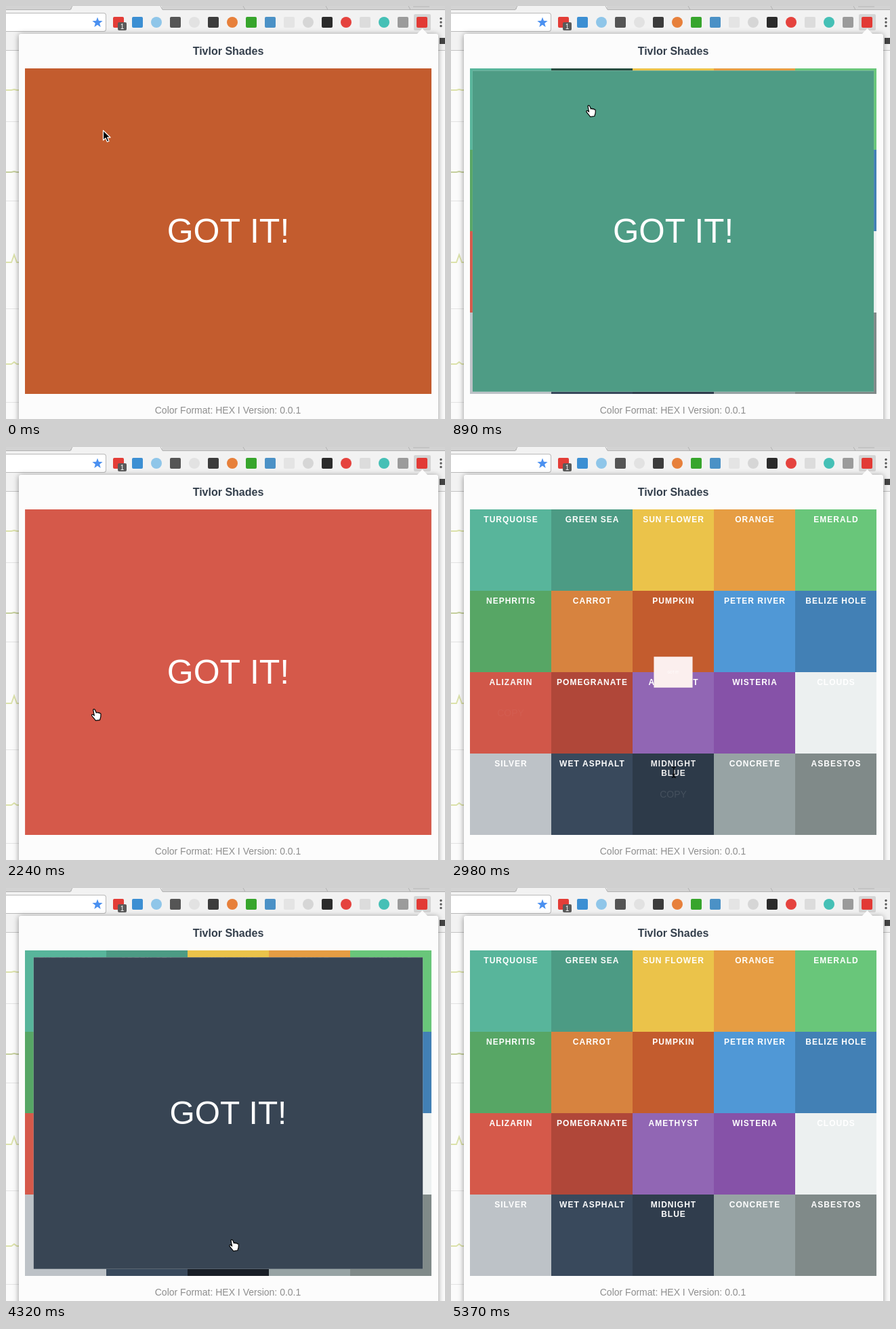
An HTML page with a canvas that plays this animation: 648 px wide and 609 px high, repeating every 5.51 s.

```html
<!DOCTYPE html>
<html lang="en">
<head>
<meta charset="utf-8">
<title>Color picker popup</title>
<style>
html, body { margin: 0; width: 100%; height: 100%; overflow: hidden; background: #fff; }
canvas { display: block; }
</style>
</head>
<body>
<canvas width="648" height="609"></canvas>
<script>
const ctx = document.querySelector('canvas').getContext('2d');
const LOOP = 5510, STEPS = 37, STEP = LOOP / STEPS;
const SANS = '"Liberation Sans", Arial, sans-serif';
const GRID = { x: 28, y: 92, w: 600, h: 480, tile: 120, columns: 5 };
const ZOOM = 500, SHOWN = 918, FADE = 300;

const tiles = Object.entries({
  'TURQUOISE': '#58b59b', 'GREEN SEA': '#4c9b84', 'SUN FLOWER': '#ebc34a', 'ORANGE': '#e69d43', 'EMERALD': '#69c67a',
  'NEPHRITIS': '#57a665', 'CARROT': '#d7833f', 'PUMPKIN': '#c35c2e', 'PETER RIVER': '#5098d6', 'BELIZE HOLE': '#4280b5',
  'ALIZARIN': '#d5594a', 'POMEGRANATE': '#b04739', 'AMETHYST': '#9166b4', 'WISTERIA': '#8652a8', 'CLOUDS': '#ecf0f0',
  'SILVER': '#bdc2c7', 'WET ASPHALT': '#39495c', 'MIDNIGHT\nBLUE': '#303d4d', 'CONCRETE': '#97a3a4', 'ASBESTOS': '#808a89'
});

// The pointer enters a tile, clicks it and leaves
const visits = [
  { tile: 7, enter: -1500, click: -SHOWN, leave: -500 },
  { tile: 1, enter: 330, click: 468, leave: 1200 },
  { tile: 10, enter: 1600, click: 1745, leave: 2755 },
  { tile: 17, enter: 2945, click: 3948, leave: 4500 }
];

// Pointer stops
const stops = [
  { t: 0, x: 143, y: 183 }, { t: 450, x: 199, y: 146 }, { t: 1190, x: 199, y: 146 },
  { t: 1640, x: 97, y: 390 }, { t: 2240, x: 126, y: 386 }, { t: 2540, x: 126, y: 411 }, { t: 2690, x: 126, y: 411 },
  { t: 2980, x: 330, y: 480 }, { t: 3300, x: 329, y: 518 }, { t: 4500, x: 329, y: 518 }, { t: 5070, x: 340, y: 625 }
];

const buttonColors = ('#e33d37 #3c8fd3 #8fc6e9 #555 #e2e2e2 #3c3c3c #e7803b #37a52c #4b91c6 ' +
  '#e4e4e4 #d6d6d6 #2b2b2b #e5433e #dcdcdc #45c0b6 #9b9b9b #e23a35').split(' ');
const roundButtons = [2, 4, 6, 10, 12, 14];

const mix = (a, b, f) => a + (b - a) * f;

// CSS "ease": cubic-bezier(.25, .1, .25, 1)
function ease(x) {
  if (x <= 0) return 0;
  if (x >= 1) return 1;
  let lo = 0, hi = 1, u;
  for (let i = 0; i < 20; i++) {
    u = (lo + hi) / 2;
    if (.75 * u * (1 - u) + u ** 3 < x) lo = u; else hi = u;
  }
  return .3 * u * (1 - u) ** 2 + 3 * u * u * (1 - u) + u ** 3;
}

// Rises from one time and falls again from another
const pulse = (t, from, to, duration) =>
  t < to ? ease((t - from) / duration) : 1 - ease((t - to) / duration);

function pointerAt(t) {
  const next = stops.findIndex(stop => stop.t > t);
  if (next < 0) return stops.at(-1);
  const a = stops[next - 1], b = stops[next], f = (t - a.t) / (b.t - a.t);
  return { x: mix(a.x, b.x, f), y: mix(a.y, b.y, f) };
}

function rect(color, x, y, w, h, radius = 0) {
  ctx.fillStyle = color;
  ctx.beginPath();
  ctx.roundRect(x, y, w, h, radius);
  ctx.fill();
}

function circle(color, x, y, r) {
  rect(color, x - r, y - r, 2 * r, 2 * r, r);
}

function text(str, x, y, font, color, spacing = 0) {
  ctx.font = `${font} ${SANS}`;
  ctx.letterSpacing = spacing + 'px';
  ctx.textAlign = 'center';
  ctx.fillStyle = color;
  ctx.fillText(str, x, y);
}

function line(color, width, points) {
  ctx.strokeStyle = color;
  ctx.lineWidth = width;
  ctx.beginPath();
  points.forEach(([x, y]) => ctx.lineTo(x, y));
  ctx.stroke();
}

function drawStar(x, y, r) {
  ctx.fillStyle = '#4a90f0';
  ctx.beginPath();
  for (let i = 0; i < 10; i++) {
    const a = i * Math.PI / 5 - Math.PI / 2, d = i % 2 ? r * .42 : r;
    ctx.lineTo(x + d * Math.cos(a), y + d * Math.sin(a));
  }
  ctx.fill();
}

function drawTabs() {
  rect('#f2f2f2', 0, 0, 648, 65);
  rect('#d3d3d3', 0, 0, 97, 5);
  rect('#d3d3d3', 230, 0, 418, 5);
  line('#b2b2b2', 1, [[0, 5.5], [95, 5.5], [98, 0]]);
  line('#b2b2b2', 1, [[228, 0], [231, 5.5], [648, 5.5]]);
  for (let x = 350; x < 600; x += 122) line('#b2b2b2', 1, [[x, 0], [x + 3, 5.5]]);
  rect('#c4c4c4', 601, 0, 24, 2);
  line('#c4c4c4', 1, [[0, 65.5], [648, 65.5]]);
}

function drawToolbar() {
  rect('#b9b9b9', -5, 10, 153, 28, 4);
  rect('#fff', -5, 11, 152, 26, 3);
  drawStar(135, 24.5, 8);
  rect('#d5d5d5', 602, 12, 25, 24, 2);
  buttonColors.forEach((color, i) => {
    const x = 166 + 28 * i;
    if (roundButtons.includes(i)) circle(color, x, 24, 8);
    else rect(color, x - 8, 16, 16, 16, 2);
  });
  rect('#5a5a5a', 165, 24, 13, 12, 2);
  text('1', 171.5, 34, '10px', '#fff');
  for (let i = -1; i <= 1; i++) circle('#5a5a5a', 642, 24 + 5.5 * i, 1.7);
  rect('#444', 640, 47, 8, 9);
}

// Left edge of the page: charts with a small peak each
function drawPage() {
  rect('#fbfbfb', 0, 0, 648, 609);
  for (const y of [170, 287, 446, 584]) rect('#e3e3e3', 0, y, 19, 1);
  [[124, 1], [245, 1], [378, 11], [528, 3]].forEach(([y, peak], i) => {
    const points = Array.from({ length: 20 }, (_, x) => [x, y - peak * Math.max(0, 1 - Math.abs(x - 12) / 4)]);
    line(i === 1 ? '#c5cf9c' : '#dce2aa', 2, points);
  });
}

function drawPopup() {
  ctx.save();
  ctx.shadowColor = 'rgba(0,0,0,.42)';
  ctx.shadowBlur = 8;
  ctx.shadowOffsetY = 1;
  rect('#fcfcfc', 19, 41, 619, 600, 3);
  ctx.restore();
  ctx.fillStyle = '#fcfcfc';
  ctx.fill(new Path2D('M606 42L614.5 33L623 42Z'));
  text('Tivlor Shades', 328, 72, 'bold 16px', '#343f4c');
  text('Color Format: HEX I Version: 0.0.1', 327.5, 601, '14px', '#8e8e8e');
}

function drawTiles(t) {
  const { tile: size, columns } = GRID;
  tiles.forEach(([name, color], i) => {
    const x = GRID.x + i % columns * size, y = GRID.y + Math.floor(i / columns) * size;
    rect(color, x, y, size, size);
    name.split('\n').forEach((part, row) =>
      text(part, x + size / 2 + .5, y + 19 + 14 * row, 'bold 12px', '#fff', 1));
    const visit = visits.find(v => v.tile === i);
    if (!visit) return;
    ctx.globalAlpha = pulse(t, visit.enter, visit.leave, FADE);
    rect('rgba(0,0,0,.5)', x, y, size, size);
    text('COPY', x + size / 2, y + 65, '14px', '#fff');
    ctx.globalAlpha = 1;
  });
}

function drawNotice(t) {
  const { tile, click } = visits.findLast(v => t >= v.click);
  const scale = pulse(t, click, click + SHOWN, ZOOM);
  if (scale < .002) return;
  const { x, y, w, h } = GRID;
  ctx.save();
  ctx.translate(x + w / 2, y + h / 2);
  ctx.scale(scale, scale);
  rect('#fff', -w / 2, -h / 2, w, h);
  ctx.globalAlpha = scale;
  rect(tiles[tile][1], -w / 2, -h / 2, w, h);
  ctx.globalAlpha = 1;
  text('GOT IT!', 0, 17, '50px', '#fff');
  ctx.restore();
}

const arrow = new Path2D('M.5 .5V15L4 11.8L6.4 17.3L9 16.2L6.6 10.8H11Z');
const hand = new Path2D('M3 1.5C3.5 .3 5.3 .4 5.8 1.8L7.6 6C8.2 4.8 9.8 5 10.2 6.2C10.8 5.2 12.2 5.5 12.5 6.8' +
  'C13.4 6.2 14.3 6.8 14.3 8C14.6 11 14 13.5 12.8 16.5L6.5 17.3C5 14.5 2.5 12.5 1 10.2C.3 8.6 1.8 7.8 3.2 8.8L4.6 10Z');
const beam = new Path2D('M-3 -8Q0 -8 0 -5V5Q0 8 -3 8M3 -8Q0 -8 0 -5V5Q0 8 3 8M-2 3H2');

function drawPointer(t) {
  const { x, y } = pointerAt(t);
  const overLabel = t > 2900 && t < 3050;
  const isArrow = t < 200 || y > GRID.y + GRID.h;
  const shape = overLabel ? beam : isArrow ? arrow : hand;
  ctx.save();
  ctx.translate(x, y);
  ctx.lineJoin = 'round';
  ctx.lineWidth = 1.2;
  ctx.fillStyle = isArrow ? '#000' : '#fff';
  ctx.strokeStyle = isArrow ? '#fff' : '#000';
  if (!overLabel) ctx.fill(shape);
  ctx.stroke(shape);
  ctx.restore();
}

const start = performance.now();
function render() {
  const elapsed = (performance.now() - start) % LOOP;
  const t = Math.min(STEPS - 1, Math.floor((elapsed + 6) / STEP)) * STEP;
  drawPage();
  drawTabs();
  drawToolbar();
  drawPopup();
  drawTiles(t);
  drawNotice(t);
  drawPointer(t);
  requestAnimationFrame(render);
}
render();
</script>
</body>
</html>
```
